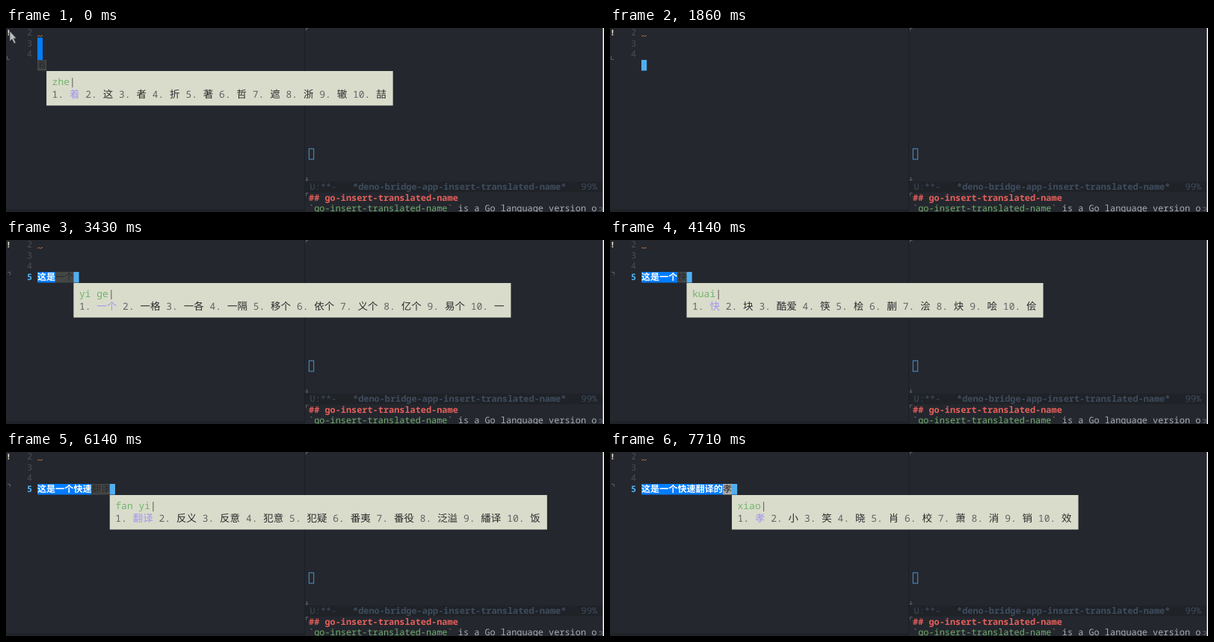
Animation of 800x248 px, one loop 8 s. Source, as an HTML page:

```html
<!DOCTYPE html>
<html lang="zh-CN">
<head>
<meta charset="utf-8">
<style>
html, body { margin: 0; height: 100%; overflow: hidden; background: #24272e; }
svg { display: block; }
text { font: 11.9px 'Noto Sans Mono', monospace; white-space: pre; text-rendering: geometricPrecision; }
.b { font-weight: 700; }
.han { font-family: 'Noto Sans CJK SC', 'Noto Sans CJK', sans-serif; font-size: 12.1px; }
.num { fill: #4a4d54; }
.mode { fill: #3f4d5e; }
#popup text { font-size: 13px; }
#popup .han { font-size: 13.5px; fill: #2b2c2e; }
#popup .pick { fill: #a594ee; }
.fringe { fill: none; stroke: #5d6168; }
</style>
</head>
<body>
<svg width="800" height="248" viewBox="0 0 800 248">
  <rect width="800" height="248" fill="#24272e"/>
  <rect y="244" width="400" height="4" fill="#1f2227"/>
  <rect x="399" width="1" height="248" fill="#1c1f24"/>
  <rect x="400" y="207" width="398.5" height="14.5" fill="#1f2227"/>
  <rect x="798.5" width="1.5" height="248" fill="#fff"/>

  <text class="num" x="28" y="9.7">2</text>
  <text class="num" x="28" y="24.5">3</text>
  <text class="num" x="28" y="39.3">4</text>

  <path class="fringe" d="M401.5 3.5V.5H404.5M402.5 201V206M400.5 204L402.5 206L404.5 204M401.5 226.5V222.5H404.5"/>
  <rect x="405.4" y="162.8" width="6.3" height="14.2" fill="none" stroke="#4898cd"/>
  <text class="mode" x="406.5" y="218">U:**-</text>
  <text class="mode b" x="464" y="218">*deno-bridge-app-insert-translated-name*</text>
  <text class="mode" x="769.5" y="218">99%</text>
  <text class="b" x="405" y="233" fill="#e5605b">## go-insert-translated-name</text>
  <text x="405" y="247.4" fill="#a9adb4"><tspan fill="#777b80">`</tspan><tspan fill="#70ad6b">go-insert-translated-name</tspan><tspan fill="#b46a62">`</tspan> is a Go language version o</text>
  <path class="fringe" d="M793 242H797V246H793"/>

  <g id="flags">
    <text class="b" x=".3" y="9.5" fill="#f3e9cf" style="font-size:10.5px">!</text>
    <path d="M42 11.5L44 10L46 11.5L48 10L49 11" fill="none" stroke="#d5824f" stroke-width=".8"/>
  </g>
  <path id="tail" class="fringe"/>
  <text id="five" class="b" x="28" y="54.2" fill="#51afef">5</text>

  <rect id="column" x="42" y="13" width="7" height="30" fill="#007cff"/>
  <rect id="doneBox" x="42" y="43" height="14.5" fill="#007cff"/>
  <text id="done" class="han b" x="42" y="54" fill="#fff"></text>
  <rect id="preBox" y="43" height="14.5"/>
  <text id="pre" class="han" y="54" fill="#25282c"></text>
  <rect id="cursor" y="43" width="7.2" height="14.5" fill="#51afef"/>

  <g id="popup">
    <rect id="panel" y="58" height="46.5" fill="#dadccb"/>
    <text id="input" y="77" fill="#70b56c"></text>
    <text id="list" y="94" fill="#606366"></text>
  </g>
  <path id="mouse" d="M5 4V18L8 15L11 21L13 20L10.5 14H14Z" fill="#b9bbbd" stroke="#33363b" stroke-width=".7"/>
</svg>
<script>
const LOOP = 8000, LEFT = 42, HAN = 12.1, CELL = 7.8, BIG = 13.5, PAD = 7.5;

const zhe = '着 这 者 折 著 哲 遮 浙 辙 喆';
const zheS = '这是 这时候 这事 这使 这所 这束 这说 折射 折损 这岁';
const zheShi = '这是 这时 这事 这使 赭石 折实 镝矢 遮饰 着 这';
const yiG = '一个 一共 一股 一根 一贯 一更 一概 一国 一格 一过';
const yiGe = '一个 一格 一各 一隔 移个 依个 义个 亿个 易个 一';
const kuai = '快 块 酷爱 筷 桧 蒯 浍 炔 哙 侩';
const kuaiS = '快速 快水 快手 快艘 快闪 快说 快使 块数 快算 快送';
const kuaiSu = '快速 快诉 快宿 块素 快塑 快苏 快俗 快酥 快肃 快';
const fanYi = '翻译 反义 反意 犯意 犯疑 番夷 番役 泛溢 繙译 饭';

// time, committed text, pre-edit text, typed keys, candidates, options
const steps = [
  [0, '', '着', 'zhe', zhe, { noCursor: 1 }],
  [290, '', '这是', 'zhe s', zheS],
  [430, '', '这是', 'zhe shi', zheShi],
  [570, '这是', '', '', '', { noFlags: 1 }],
  [710, '这是'],
  [1140, '这'],
  [1290, '', '', '', '', { line5: 1 }],
  [1430, ''],
  [2290, '', '在', 'z', '在 这 中 只 再 着 自 做 则 子'],
  [2430, '', '中', 'zh', '中 这 只 着 者 之 种 长 正 住'],
  [2570, '', '着', 'zhe', zhe],
  [2710, '', '这是', 'zhe s', zheS],
  [2860, '', '这是', 'zhe shi', zheShi],
  [3000, '这是', '', '', '', { noFlags: 1 }],
  [3140, '这是', '一', 'y', '一 有 也 要 又 用 与 于 已 以'],
  [3290, '这是', '一个', 'yi g', yiG],
  [3430, '这是', '一个', 'yi ge', yiGe],
  [3570, '这是一个', '', '', '', { noFlags: 1 }],
  [3710, '这是一个', '看', 'k', '看 可 快 开 口 空 刻 块 课 靠'],
  [3860, '这是一个', '哭', 'ku', '哭 苦 库 酷 裤 枯 窟 骷 绔 刳'],
  [4000, '这是一个', '跨', 'kua', '跨 夸 垮 挎 胯 侉 姱 骻 锞 咵'],
  [4140, '这是一个', '快', 'kuai', kuai],
  [4570, '这是一个', '快速', 'kuai s', kuaiS],
  [5000, '这是一个', '快速', 'kuai su', kuaiSu],
  [5140, '这是一个', '快速', '', '', { noCursor: 1 }],
  [5290, '这是一个', '快速'],
  [5430, '这是一个快速', '', '', '', { noFlags: 1 }],
  [5570, '这是一个快速', '发', 'f', '发 分 放 非 反 风 法 服 飞 份'],
  [5710, '这是一个快速', '发', 'fa', '发 法 罚 乏 伐 阀 筏 珐 砝 垡'],
  [5860, '这是一个快速', '反', 'fan', '反 翻 饭 烦 范 犯 返 凡 番 泛'],
  [6000, '这是一个快速', '翻译', 'fan y', fanYi],
  [6140, '这是一个快速', '翻译', 'fan yi', fanYi],
  [6570, '这是一个快速', '翻译'],
  [6710, '这是一个快速翻译', '', '', '', { noFlags: 1 }],
  [6860, '这是一个快速翻译', '的', 'd', '的 到 大 都 对 地 得 多 点 等'],
  [7000, '这是一个快速翻译', '的', 'de', '的 得 地 德 嘚 底 锝 徳 悳 惪'],
  [7140, '这是一个快速翻译的', '', '', '', { noFlags: 1 }],
  [7290, '这是一个快速翻译的', '想', 'x', '想 下 小 先 新 行 向 像 些 学'],
  [7430, '这是一个快速翻译的', '系', 'xi', '系 西 喜 洗 细 戏 席 息 习 希'],
  [7570, '这是一个快速翻译的', '下', 'xia', '下 夏 吓 瞎 虾 侠 峡 霞 狭 辖'],
  [7710, '这是一个快速翻译的', '孝', 'xiao', '孝 小 笑 晓 肖 校 萧 消 销 效', { light: 1 }],
];

const $ = id => document.getElementById(id);
const set = (id, attrs) => { for (const k in attrs) $(id).setAttribute(k, attrs[k]); };
const show = (id, on) => set(id, { visibility: on ? 'visible' : 'hidden' });

function drawPopup(x, keys, list) {
  show('popup', list);
  if (!list) return;
  const words = list.split(' ');
  const chars = list.length - words.length + 1;
  set('panel', { x, width: chars * BIG + (words.length * 4 + 0.2) * CELL + PAD * 2 });
  set('input', { x: x + PAD });
  set('list', { x: x + PAD });
  $('input').innerHTML = `${keys}<tspan fill="#55504a">|</tspan>`;
  $('list').innerHTML = words.map((w, i) =>
    `${i + 1}. <tspan class="han${i ? '' : ' pick'}">${w}</tspan>`).join(' ');
}

function draw([time, done, pre = '', keys = '', list = '', opt = {}]) {
  const mid = LEFT + done.length * HAN, end = mid + pre.length * HAN;
  const line5 = !!done || opt.line5;
  $('done').textContent = done;
  $('pre').textContent = pre;
  set('doneBox', { width: mid - LEFT });
  set('preBox', { x: mid, width: end - mid, fill: opt.light ? '#a9aaa5' : '#454745' });
  set('pre', { x: mid });
  set('cursor', { x: end });
  set('tail', { d: line5 ? 'M2 43.5H5.5V47' : 'M1.5 38V42.5H5' });
  show('cursor', !opt.noCursor);
  show('five', line5);
  show('flags', !opt.noFlags);
  drawPopup(end, keys, list);
}

const start = performance.now();
let last;
function tick() {
  const t = (performance.now() - start) % LOOP;
  const step = steps.findLast(s => s[0] <= t);
  if (step !== last) draw(last = step);
  show('column', t < 1860);
  show('mouse', t < 1860);
  requestAnimationFrame(tick);
}
tick();
</script>
</body>
</html>
```
